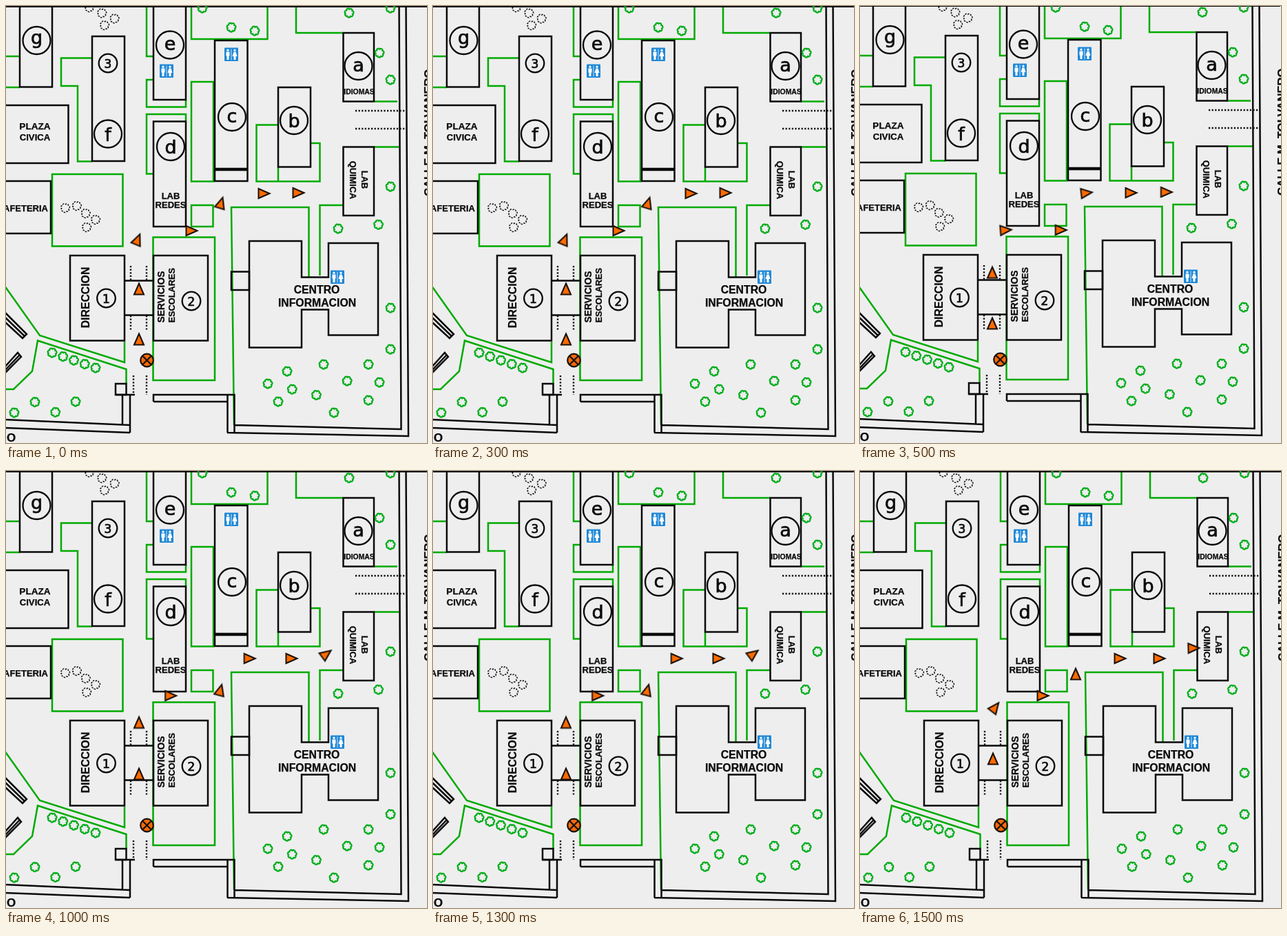
An HTML page that plays this animation: 611x634 px, repeating every 2 s.

```html
<!DOCTYPE html>
<html lang="es">
<head>
<meta charset="utf-8">
<title>Plano del campus</title>
<style>
  html, body { margin: 0; width: 100%; height: 100%; overflow: hidden; background: #eee; }
  svg { display: block; width: 611px; height: 634px; }
  text { fill: #0a0a0a; stroke: #0a0a0a; stroke-width: .25; font-family: "Liberation Sans", Arial, sans-serif; font-weight: bold; }
  .glyph { font-family: "DejaVu Sans", Verdana, sans-serif; font-weight: normal; text-anchor: middle; stroke-width: .7; }
  .wall, .ring { fill: none; stroke: #0a0a0a; stroke-width: 2.5; }
  .ring { stroke-width: 2.3; }
  .lawn { fill: none; stroke: #0a0; stroke-width: 2.5; }
  .tree { fill: none; stroke: #00ae1c; stroke-width: 2.3; }
  .bush { fill: none; stroke: #111; stroke-width: 1.5; stroke-dasharray: 2.4 1.6; }
  .dots { fill: none; stroke: #0a0a0a; stroke-width: 2.4; stroke-dasharray: 2.2 2.4; }
  .arrow { fill: #ff6a00; stroke: #1a1008; stroke-width: 2.1; }
</style>
</head>
<body>
<svg id="stage" viewBox="0 0 611 634"></svg>
<script>
const NS = "http://www.w3.org/2000/svg";

function add(parent, tag, attrs = {}, content) {
  const el = document.createElementNS(NS, tag);
  for (const k in attrs) el.setAttribute(k, attrs[k]);
  if (content !== undefined) el.textContent = content;
  return parent.appendChild(el);
}

const map = add(document.getElementById("stage"), "g");
const path = (cls, d) => add(map, "path", { class: cls, d });
const box = (cls, x, y, w, h) => add(map, "rect", { class: cls, x, y, width: w, height: h });

// n points spread evenly along a path: position and heading (0 = up)
function along(d, n) {
  const p = document.createElementNS(NS, "path");
  p.setAttribute("d", d);
  const len = p.getTotalLength();
  return Array.from({ length: n }, (_, i) => {
    const s = n > 1 ? len * i / (n - 1) : 0;
    const at = p.getPointAtLength(s);
    const a = p.getPointAtLength(Math.max(0, s - 1)), b = p.getPointAtLength(Math.min(len, s + 1));
    return { x: at.x, y: at.y, turn: Math.atan2(b.y - a.y, b.x - a.x) * 180 / Math.PI + 90 };
  });
}

// Lawns
path("lawn", `M-2 73H20M-2 118H20
  M125 75.5H80V116H104V225.5H125
  M204 -2V73H214M214 107H204V146.5H261V136M261 167V157H204V243.5H214
  M269 -2V48H379.5V-2M421 -2V39H489
  M395 172.5H363.5V254.5H455.5V199H442M395 233V254
  M534 138.5H568M534 204.5H571
  M331 608L327 292H439.5V394M455.5 391V289H489
  M-2 406L49 478L172 517V487M-2 556H11L38 530L46 485.5L174.5 527V548`);
box("lawn", 269, 110, 32, 144.5);
box("lawn", 67, 244, 102.5, 104.5);
box("lawn", 269, 289, 31.5, 31);
box("lawn", 213.5, 335.5, 89.5, 207.5);

// Buildings
box("wall", 20, -8, 47, 125.5);
box("wall", 125, 44, 47, 181);
box("wall", -8, 144, 98.5, 84);
box("wall", -8, 254, 73, 76);
box("wall", 214, -8, 47, 144);
box("wall", 214, 167.5, 47, 152.5);
box("wall", 303, 50, 47.5, 204);
box("wall", 395, 118, 47, 115.5);
box("wall", 489.5, 39, 44.5, 99.5);
box("wall", 489.5, 204.5, 44.5, 99.5);
for (const x of [93, 214]) box("wall", x, 362, 79, 123.5);
box("wall", 327, 385.5, 26, 26.5);
box("wall", 159, 548, 15.5, 16);
path("wall", "M353 341H429V393.5H468V344H540V477.5H468V440.5H429V495.5H353Z");
path("wall", "M172 398.5H214M172 448.5H214M303 236H350M303 238H350");

// Outer walls and benches
path("wall", `M0 .8H611
  M159 564H187M169 564V608M180 564V619M-2 600L180 608M-2 612L180 619
  M214 574V564H331.5V619M214 574H321.5M321.5 564V619
  M570.5 0L573.5 614L331 608M580.5 0L584 624L321 619`);
path("wall", "M-2 444L30 476L24 482L-2 458M-2 451L27 479");
path("wall", "M-2 524L17 503L22 509L-2 533M-2 529L20 506");

path("dots", "M507 152H581M507 178H581");
for (const x of [181, 204]) path("dots", `M${x} 377V398M${x} 449V472`);
for (const x of [185, 204]) path("dots", `M${x} 536V564`);

// A row of n scalloped shrubs
function shrubs(cls, d, n, lobes = 7, r = 5.4) {
  const bump = r * Math.sin(Math.PI / lobes) * 1.06;
  for (const { x, y } of along(d, n)) {
    let outline = "";
    for (let i = 0; i <= lobes; i++) {
      const a = 2 * Math.PI * i / lobes + .3;
      outline += (i ? `A${bump} ${bump} 0 0 1 ` : "M") + `${x + r * Math.cos(a)} ${y + r * Math.sin(a)}`;
    }
    path(cls, outline + "Z");
  }
}
shrubs("tree", "M285 3", 1);
shrubs("tree", "M327 31L361 36", 2);
shrubs("tree", "M498 10L558 3", 2);
shrubs("tree", "M542 68L558 107", 2);
shrubs("tree", "M558 262L542 317L482 323", 3);
shrubs("tree", "M558 438V498", 2);
shrubs("tree", "M380 548L450 564L476 590", 4);
shrubs("tree", "M408 530L395 574", 2);
shrubs("tree", "M461 520L498 546L526 572", 3);
shrubs("tree", "M526 520L542 546", 2);
shrubs("tree", "M67 503L130 525", 5);
shrubs("tree", "M12 590L43 574L73 590L101 574", 4);
shrubs("bush", "M121 2L143 12L159 19L143 28", 4);
shrubs("bush", "M86 293L103 290L117 302L130 310L117 321", 5);

// Labels
function label(s, x, y, size, anchor = "middle", turn = 0) {
  add(map, "text", {
    "font-size": size, "text-anchor": anchor,
    transform: `translate(${x} ${y}) rotate(${turn})`
  }, s);
}
label("PLAZA", 42, 178.5, 13.6);
label("CIVICA", 42, 194.5, 13.2);
label("CAFETERIA", 61, 298, 13, "end");
label("LAB", 239, 280, 13);
label("REDES", 239, 293, 13);
label("IDIOMAS", 512.5, 128, 10.4);
label("CENTRO", 451, 417, 15.8);
label("INFORMACION", 451.5, 436, 15.8);
label("DIRECCION", 121, 423, 15.8, "middle", -90);
label("SERVICIOS", 230, 459.5, 13.8, "start", -90);
label("ESCOLARES", 245, 459.5, 12.8, "start", -90);
label("LAB", 516, 252, 12.8, "middle", 90);
label("QUIMICA", 499, 252.5, 12.8, "middle", 90);
label("CALLE M. TOLVANERO", 618.5, 276, 16.6, "start", -90);
label("O", 1, 632, 17, "start");

// Circled letters and digits, each glyph centred on its ink
const pen = document.createElement("canvas").getContext("2d");
function mark(s, x, y) {
  const big = isNaN(s), size = big ? 27 : 17;
  pen.font = `${size}px "DejaVu Sans", Verdana, sans-serif`;
  const ink = pen.measureText(s);
  const drop = (ink.actualBoundingBoxAscent - ink.actualBoundingBoxDescent) / 2;
  add(map, "circle", { class: "ring", cx: x, cy: y, r: big ? 20 : 13.3 });
  add(map, "text", { class: "glyph", x, y: y + drop, "font-size": size }, s);
}
mark("g", 44.5, 50);
mark("e", 238, 56.5);
mark("f", 148, 185.5);
mark("d", 239, 204);
mark("c", 328, 161);
mark("b", 418, 166);
mark("a", 511.5, 87);
mark("3", 148, 83);
mark("1", 145.5, 424);
mark("2", 269, 428);

// Restroom signs
function restroom(x, y) {
  const sign = add(map, "g", { transform: `translate(${x} ${y})`, fill: "#fff" });
  add(sign, "rect", { width: 20, height: 19.5, rx: 1, fill: "#1e88d8" });
  add(sign, "rect", { x: 9.6, y: 2, width: .8, height: 16 });
  for (const cx of [5, 15]) add(sign, "circle", { cx, cy: 3.7, r: 1.6 });
  add(sign, "path", { d: "M2.5 6H7.5V12H6.5V17.5H3.5V12H2.5ZM13.5 6H16.5L18.5 12.5H16.5V17.5H13.5V12.5H11.5Z" });
}
restroom(317, 60.5);
restroom(223, 84.5);
restroom(471, 383.5);

// Start point
const start = add(map, "g", { transform: "translate(204.5 514)", stroke: "#1a1008", "stroke-width": 2.2 });
add(start, "circle", { r: 9.3, fill: "#f26a0a" });
add(start, "path", { d: "M-6 -6L6 6M6 -6L-6 6" });

// Plays a list of values as equal hard steps
const hold = (el, values) => {
  const frames = [...values, values[0]].map((transform, i) =>
    ({ transform, offset: i / values.length, easing: "step-end" }));
  el.animate(frames, { duration: 2000, iterations: Infinity }).startTime = 0;
};

// One arrow travels each leg of the route, four stops per loop
const legs = [
  "M193 484V418",
  "M193 411V362Q193 346 196 343",
  "M191 339Q196 326 217 326H265",
  "M269 326H304Q313 327 313 295",
  "M312 286Q316 272 334 272H377",
  "M374 272H434",
  "M424 271H458Q474 257 484 257"
];
for (const leg of legs) {
  const arrow = path("arrow", "M0 -8.5L7 7.5H-7Z");
  hold(arrow, along(leg, 4).map(p => `translate(${p.x}px, ${p.y}px) rotate(${p.turn}deg)`));
}

// The whole plan jumps one pixel up and left on the second step
hold(map, [0, -1, 0, 0].map(d => `translate(${d}px, ${d}px)`));
</script>
</body>
</html>
```
